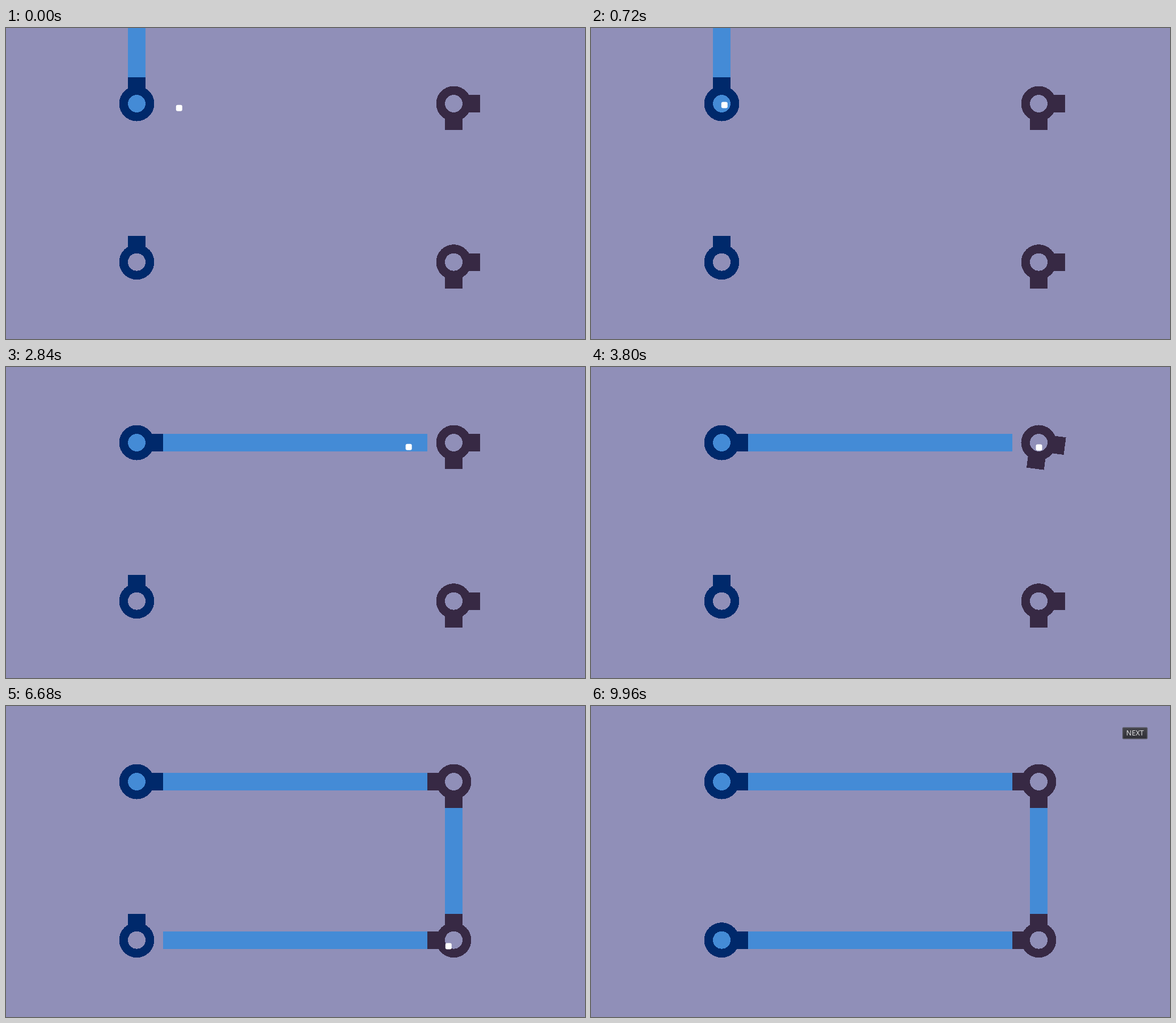
An HTML page that plays this animation: 1021 by 549 pixels, repeating every 10 s.

```html
<!DOCTYPE html>
<html lang="en">
<head>
<meta charset="utf-8">
<title>Pipe puzzle</title>
<style>
  html, body { margin: 0; width: 100%; height: 100%; overflow: hidden; background: #908fb8; }
  svg { display: block; width: 1021px; height: 549px; }
  #board { shape-rendering: crispEdges; }
  text { font: 12.6px "Noto Sans", "Open Sans", sans-serif; fill: #dedee0; }
</style>
</head>
<body>
<svg id="stage" viewBox="0 0 1021 549">
  <defs>
    <linearGradient id="shade" x2="0" y2="1">
      <stop offset="0" stop-color="#45454b"/>
      <stop offset="1" stop-color="#303036"/>
    </linearGradient>
  </defs>
  <g id="board"></g>
  <g id="next">
    <rect x="937" y="37.5" width="44.5" height="21" rx="2" fill="#55555f"/>
    <rect x="938.5" y="39" width="41.5" height="18" rx="1" fill="url(#shade)"/>
    <text x="959.3" y="52" text-anchor="middle">NEXT</text>
  </g>
  <rect id="cursor" x="-5.5" y="-5.5" width="11" height="11" rx="3" fill="#fff"/>
</svg>
<script>
const LOOP = 10000, R = 15.5, PORT = 46.5;
const BG = '#908fb8', WATER = '#448bd6', NAVY = '#00296b', PLUM = '#372944';
const LEFT = 230.5, RIGHT = 789.5, TOP = 133.5, BOTTOM = 413.2;
const SPAN = RIGHT - LEFT - 2 * PORT, DROP = BOTTOM - TOP - 2 * PORT;
const $ = id => document.getElementById(id);

function add(parent, tag, attrs) {
  const el = document.createElementNS('http://www.w3.org/2000/svg', tag);
  for (const k in attrs) el.setAttribute(k, attrs[k]);
  return parent.appendChild(el);
}

// Ports and beams point right at angle 0; each turn is [start, end].
function makeNode({ x, y, color, ports, base = 0, turns, beam, fillAt = LOOP }) {
  const g = add($('board'), 'g', {});
  const jet = beam && add(g, 'rect', {
    x: PORT, y: -R, width: beam.len, height: 2 * R, fill: WATER, transform: `rotate(${beam.angle})`
  });
  for (const a of ports)
    add(g, 'rect', { x: 0, y: -R, width: PORT, height: 2 * R, fill: color, transform: `rotate(${a})` });
  add(g, 'circle', { r: 2 * R, fill: color });
  const core = add(g, 'circle', { r: R });
  return t => {
    const angle = turns.reduce((sum, [a, b]) => sum + 90 * ease((t - a) / (b - a)), base);
    g.setAttribute('transform', `translate(${x} ${y}) rotate(${angle})`);
    core.setAttribute('fill', t >= fillAt ? WATER : BG);
    if (jet) jet.setAttribute('visibility', t >= beam.at ? 'visible' : 'hidden');
  };
}

function ease(p) {
  p = Math.min(1, Math.max(0, p));
  return p < .5 ? 2 * p * p : 1 - 2 * (1 - p) ** 2;
}

const nodes = [
  { x: LEFT, y: TOP, color: NAVY, ports: [0], base: -90, turns: [[1720, 1920]],
    beam: { angle: 0, len: SPAN, at: 0 }, fillAt: 0 },
  { x: RIGHT, y: TOP, color: PLUM, ports: [0, 90], turns: [[3760, 3960]],
    beam: { angle: 0, len: DROP, at: 3960 } },
  { x: RIGHT, y: BOTTOM, color: PLUM, ports: [0, 90], turns: [[5840, 6000], [6280, 6440]],
    beam: { angle: 0, len: SPAN, at: 6440 } },
  { x: LEFT, y: BOTTOM, color: NAVY, ports: [0], base: -90, turns: [[7440, 7640]], fillAt: 7640 }
].map(makeNode);

// Cursor moves: start, end, x, y
const start = [305.3, 141.3];
const moves = [
  [0, 640, 235.3, 136],
  [2080, 3120, 790, 142],
  [4120, 4800, 780.3, 424],
  [6680, 7360, 239.8, 407.8],
  [8840, 9320, 262, 560]
];

function cursorAt(t) {
  let [x, y] = start;
  for (const [a, b, tx, ty] of moves) {
    const p = ease((t - a) / (b - a));
    x += (tx - x) * p;
    y += (ty - y) * p;
  }
  return `translate(${x} ${y})`;
}

function draw(now) {
  const t = now % LOOP;
  nodes.forEach(update => update(t));
  $('cursor').setAttribute('transform', cursorAt(t));
  $('next').setAttribute('opacity', Math.min(1, Math.max(0, (t - 7760) / 120)));
  requestAnimationFrame(draw);
}
draw(performance.now());
</script>
</body>
</html>
```
